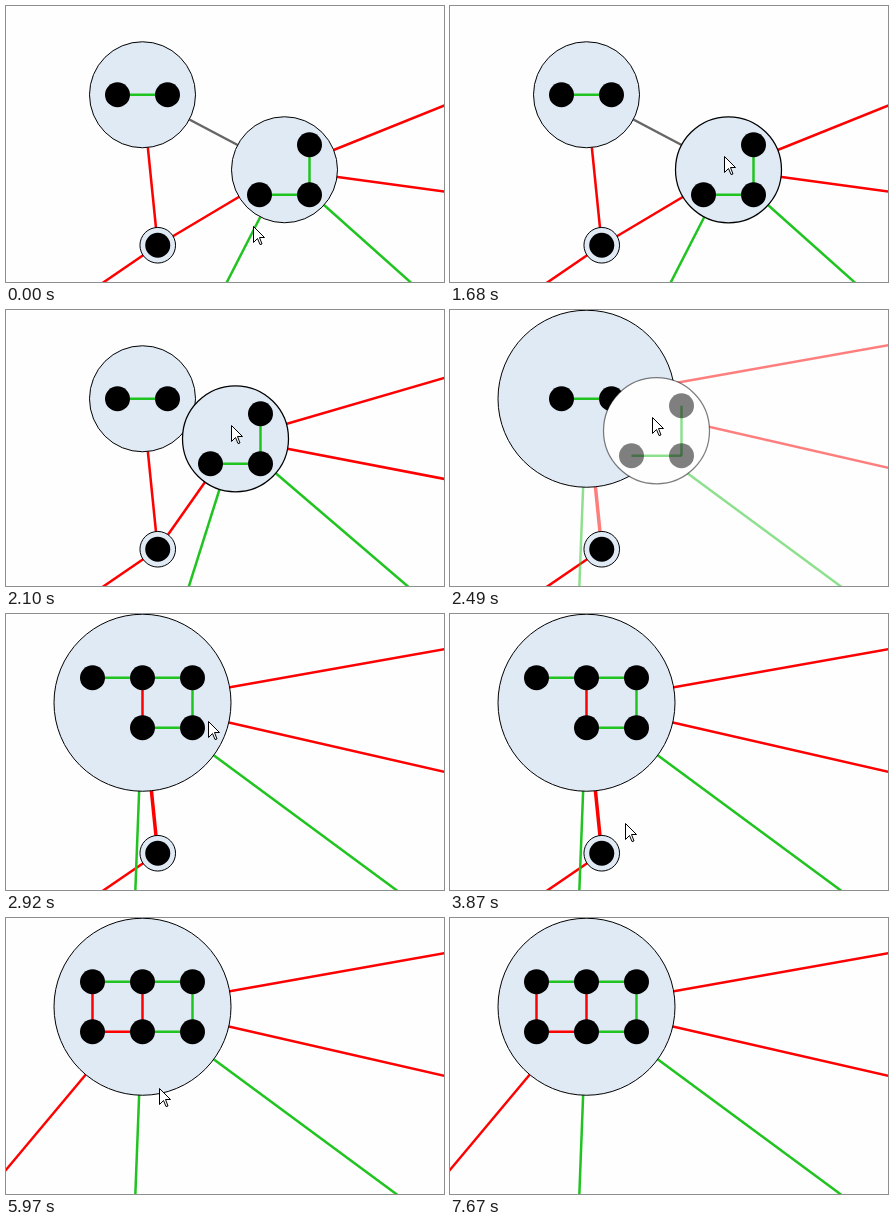
Animation of 438x276 px, one loop 8.23 s. Source, as an HTML page with a canvas:

```html
<!DOCTYPE html>
<html>
<head>
<meta charset="utf-8">
<style>
  html, body { margin: 0; width: 100%; height: 100%; overflow: hidden; background: #fefefe; }
  canvas { display: block; }
</style>
</head>
<body>
<canvas id="stage" width="438" height="276"></canvas>
<script>
const ctx = document.getElementById('stage').getContext('2d');
const LOOP = 8230, STEP = 130;
const RED = '#f00', GREEN = '#20c420', GRAY = '#666', BLUE = '#e0eaf5', PAPER = '#fefefe';

// Key times of the two merges
const GRAB_B = 1680, OVER_B = 2220, DROP_B = 2920;
const GRAB_C = 4570, OVER_C = 5020, DROP_C = 5850;

const A = [136.5, 88.75], B = [278.5, 163.75], C = [151.75, 239.25];
const FAR_TOP = [724, -15.3], FAR_RIGHT = [740, 227], FAR_LOW = [471, 335.6];
const FAR_BOTTOM = [122, 469], FAR_LEFT = [-178, 464.7];

const HOME = { x: 247, y: 220 };
const moves = [
  { start: 440, steps: 3, x: 290, y: 184 },
  { start: 830, steps: 3, x: 274, y: 150 },
  { start: 1830, steps: 2, x: 238, y: 120 },
  { start: 2100, steps: 4, x: 202, y: 107 },
  { start: 3510, steps: 4, x: 175, y: 209 },
  { start: 4020, steps: 2, x: 161, y: 236 },
  { start: 4720, steps: 5, x: 153, y: 170, ease: p => 1 - (1 - p) ** 3 },
  { start: 7250, steps: 2, x: 274, y: 228 },
  { start: 7520, steps: 2, x: 458, y: 312, ease: p => p }
];
const easeOut = p => 1 - (1 - p) ** 1.5;

// The pointer advances in hard steps, each move easing towards its end point
function pointerAt(t) {
  let { x, y } = HOME;
  for (const m of moves) {
    if (t < m.start) break;
    const step = 1 + Math.floor((t - m.start + 30) / STEP);
    const k = (m.ease || easeOut)(Math.min(1, step / m.steps));
    x += (m.x - x) * k;
    y += (m.y - y) * k;
  }
  return [Math.round(x), Math.round(y)];
}

// Dots form a green chain; the merged graph runs round a 3 x 2 grid
const cell = i => [(i % 3 - 1) * 50, i < 3 ? -25 : 25];
const ring = [0, 1, 2, 5, 4, 3].map(cell);
const chain = (dots, redLinks = []) => ({
  dots,
  links: [...dots.slice(1, 5).map((_, i) => [i, i + 1, GREEN]),
          ...redLinks.map(([i, j]) => [i, j, RED])]
});
const single = chain([[0, 0]]);
const pair = chain([[-25, 0], [25, 0]]);
const corner = chain([[25, -25], [25, 25], [-25, 25]]);
const five = chain(ring.slice(0, 5), [[1, 4]]);
const six = chain(ring, [[1, 4], [4, 5], [5, 0]]);

function line(p, q, color, alpha = 1, width = 2.5) {
  ctx.globalAlpha = alpha;
  ctx.strokeStyle = color;
  ctx.lineWidth = width;
  ctx.beginPath();
  ctx.moveTo(...p);
  ctx.lineTo(...q);
  ctx.stroke();
  ctx.globalAlpha = 1;
}

function disc(x, y, r) {
  ctx.beginPath();
  ctx.arc(x, y, r, 0, 2 * Math.PI);
}

function group([x, y], r, { dots, links }, { ghost = false, held = false } = {}) {
  const alpha = ghost ? 0.5 : 1;
  const at = i => [x + dots[i][0], y + dots[i][1]];
  disc(x, y, r);
  ctx.fillStyle = ghost ? PAPER : BLUE;
  ctx.fill();
  ctx.globalAlpha = alpha;
  ctx.strokeStyle = '#000';
  ctx.lineWidth = held ? 1.25 : 1;
  ctx.stroke();
  for (const [i, j, color] of links) line(at(i), at(j), color, alpha);
  ctx.globalAlpha = alpha;
  ctx.fillStyle = '#000';
  dots.forEach((_, i) => { disc(...at(i), 12.5); ctx.fill(); });
  ctx.globalAlpha = 1;
}

function arrow(x, y) {
  const shape = [[0, 0], [0, 16], [4, 12], [6.5, 18], [8.5, 17.5], [6, 11], [11, 11]];
  ctx.beginPath();
  for (const [dx, dy] of shape) ctx.lineTo(x + 0.5 + dx, y + 0.5 + dy);
  ctx.closePath();
  ctx.fillStyle = '#fff';
  ctx.fill();
  ctx.strokeStyle = '#000';
  ctx.lineWidth = 1;
  ctx.stroke();
}

function draw(t) {
  const [px, py] = pointerAt(t);
  const heldB = t >= GRAB_B && t < DROP_B;
  const heldC = t >= GRAB_C && t < DROP_C;
  const b = heldB ? [px + 4.5, py + 13.75] : B;
  const c = heldC ? [px - 9.25, py + 3.25] : C;
  const joinedB = t >= OVER_B, joinedC = t >= OVER_C;
  const ghostB = joinedB && t < DROP_B, ghostC = joinedC && t < DROP_C;

  ctx.fillStyle = PAPER;
  ctx.fillRect(0, 0, 438, 276);

  const hub = joinedB ? A : b, fade = ghostB ? 0.5 : 1;
  line(hub, FAR_TOP, RED, fade);
  line(hub, FAR_RIGHT, RED, fade);
  line(hub, FAR_LOW, GREEN, fade);
  line(joinedC ? A : c, FAR_LEFT, RED, ghostC ? 0.5 : 1);
  line(hub, FAR_BOTTOM, GREEN, fade);
  if (!joinedB) {
    line(A, b, GRAY);
    line(b, c, RED);
  }
  if (!joinedC) line(A, c, RED, fade, joinedB ? 3.5 : 2.5);

  const inside = t >= DROP_C ? six : t >= DROP_B ? five : pair;
  group(A, joinedB ? 88.5 : 53, inside);
  if (t < DROP_C) group(c, 17.8, single, { ghost: ghostC, held: heldC });
  if (t < DROP_B) group(b, 53, corner, { ghost: ghostB, held: heldB });
  arrow(px, py);
}

const start = performance.now();
function tick() {
  draw((performance.now() - start) % LOOP);
  requestAnimationFrame(tick);
}
tick();
</script>
</body>
</html>
```
